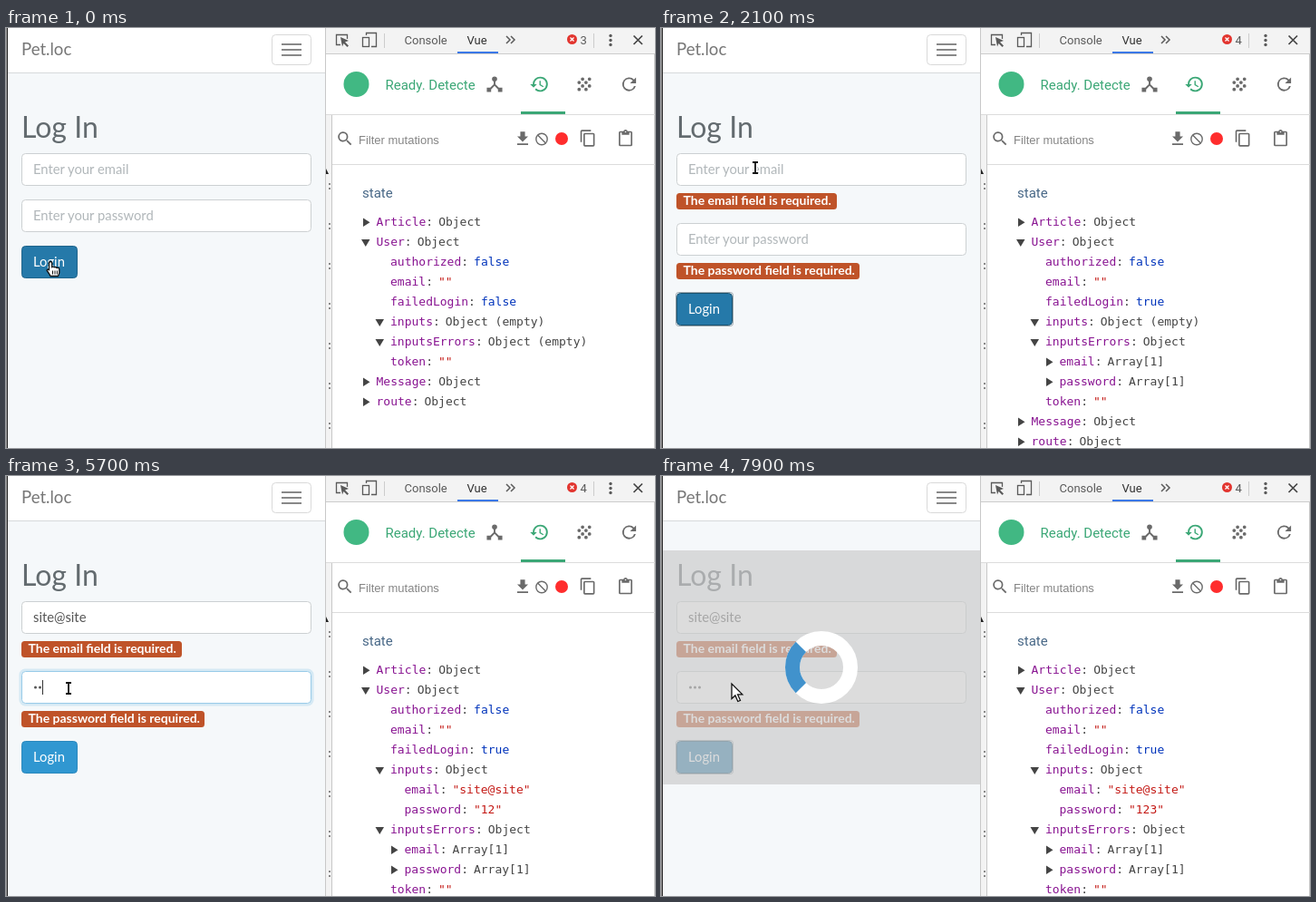
Recreate the animation shown at these times as an HTML page. Size 716x463 px, loop 8000 ms.

```html
<!DOCTYPE html>
<html lang="en">
<head>
<meta charset="utf-8">
<title>Log In</title>
<style>
  html, body { margin: 0; width: 100%; height: 100%; overflow: hidden; background: #fff; }
  svg { display: block; }
  .page { font-family: Lato, "Open Sans", sans-serif; font-size: 14.8px; fill: #636b6f; }
  .tools { font-family: Roboto, sans-serif; font-size: 13px; fill: #5a5a5a; }
  .tree { font-family: "DejaVu Sans Mono", monospace; font-size: 13px; fill: #444; }
  .hint { fill: #b1b7ba; }
  .typed { fill: #555; }
  .badge { fill: #fff; font-weight: 700; font-size: 14px; }
  .key { fill: #881391; }
  .str { fill: #c41a16; }
  .lit { fill: #0033bb; }
</style>
</head>
<body>
<svg width="716" height="463" viewBox="0 0 716 463">
  <rect width="353" height="463" fill="#f5f8fa"/>
  <rect width="353" height="49" fill="#fff"/>
  <rect y="49" width="353" height="1" fill="#d6d9db"/>
  <g class="page">
    <text x="17" y="29.5" font-size="18.6" fill="#777">Pet.loc</text>
    <rect x="293.5" y="7.5" width="43" height="33" rx="4" fill="#fff" stroke="#d9d9d9"/>
    <path d="M304 18h22M304 24h22M304 30h22" stroke="#888" stroke-width="2"/>
    <text x="17" y="121" font-size="32">Log In</text>
  </g>
  <g id="form" class="page"></g>
  <rect width="1" height="463" fill="#999"/>
  <rect x="1" width="1" height="463" fill="#222"/>

  <rect x="352" width="364" height="463" fill="#fff"/>
  <rect x="353" width="363" height="28" fill="#f3f3f3"/>
  <rect x="353" y="28" width="363" height="1" fill="#ccc"/>
  <rect x="353" y="96" width="7" height="367" fill="#f3f3f3"/>
  <path d="M352.5 0V463M359.5 96V463M715.5 29V463" stroke="#c8c8c8"/>
  <path d="M353 95.5H716M360 150.5H716" stroke="#dcdcdc"/>
  <path d="M353 155v6h3z" fill="#222"/>
  <g id="marks" fill="#888"></g>

  <g class="tools">
    <g fill="none" stroke="#5a5a5a" stroke-width="1.3">
      <path d="M376.5 12V7.5H364.500V18.500H369"/>
      <path d="M397.500 8V5.500H408.500V20.500H403"/>
      <rect x="393.500" y="10.500" width="7" height="10"/>
    </g>
    <path d="M369 10l9 4-4 1.500 4 4-1.500 1.500-4-4-1.500 3.500z"/>
    <path d="M417.500 6V22M648.500 6V22" stroke="#ccc"/>
    <text x="439.500" y="18">Console</text>
    <text x="508.500" y="18" fill="#333">Vue</text>
    <rect x="498" y="26" width="45" height="2" fill="#3b78e7"/>
    <path d="M552 9l4 4-4 4M557 9l4 4-4 4" fill="none" stroke="#5a5a5a" stroke-width="1.500"/>
    <circle cx="624.500" cy="12.500" r="5.500" fill="#e2352f"/>
    <path d="M622.500 10.500l4 4m0-4l-4 4" stroke="#fff" stroke-width="1.300"/>
    <text id="count" x="633.500" y="18"></text>
    <circle cx="667" cy="8.500" r="1.700"/><circle cx="667" cy="13.500" r="1.700"/><circle cx="667" cy="18.500" r="1.700"/>
    <path d="M692.500 8.500l9.500 9.500m0-9.500l-9.500 9.500" stroke="#444" stroke-width="1.700"/>

    <circle cx="386.500" cy="62" r="14" fill="#41b883"/>
    <text x="418.500" y="68" font-size="15" fill="#3ba776">Ready. Detecte</text>
    <rect x="568" y="92" width="49" height="3" fill="#3ba776"/>
    <g id="icons" fill="#6a6a6a"></g>
    <text x="389" y="128" fill="#858585" font-family="Liberation Sans, Arial, sans-serif">Filter mutations</text>
    <g fill="none" stroke="#6a6a6a" stroke-width="1.400"><circle cx="591" cy="122.500" r="6.200"/><path d="M586.600 118.100l8.800 8.800"/></g>
    <circle cx="613" cy="122" r="7" fill="#ff2d2d"/>
    <text x="393" y="187" font-size="15" fill="#486887">state</text>
  </g>
  <g id="tree" class="tree"></g>
  <g id="cursor"></g>
</svg>
<script>
const $ = id => document.getElementById(id);
const LOOP = 8000, STEP = 100;
const EMAIL = 'site@site', PASS = '123';
const emailKeys = [2400, 2500, 2600, 3400, 3800, 4100, 4200, 4400, 4500];
const passKeys = [5600, 5700, 5800];
const FAIL = 1500;
const loaders = [
  { from: 700, to: FAIL, spin: 683, y: 85, h: 200 },
  { from: 6400, to: LOOP, spin: 6400, y: 82, h: 258 }
];
const focusAt = [[0, ''], [700, 'login'], [2300, 'email'], [5500, 'pass'], [6300, 'login']];
// time, x, y
const path = [
  [0, 49, 257], [1700, 49, 257], [2000, 104, 154], [4700, 104, 154], [5200, 69, 234],
  [5800, 69, 234], [6100, 55, 297], [6700, 55, 297], [7100, 75, 240], [7300, 78, 229]
];

// Material-style icons: centre x, centre y, scale, path
const icons = [
  [539, 62, .95, 'M17 16l-4-4V8.820C14.160 8.400 15 7.300 15 6a3 3 0 0 0-6 0c0 1.300.840 2.400 2 2.820V12l-4 4H3v5h5v-3.050l4-4.200 4 4.200V21h5v-5z'],
  [588.5, 62, .93, 'M13 3a9 9 0 0 0-9 9H1l3.890 3.890.070.140L9 12H6a7 7 0 1 1 2.060 4.940l-1.420 1.420A9 9 0 1 0 13 3zm-1 5v5l4.280 2.540.720-1.210-3.500-2.080V8z', '#3ba776'],
  [638, 62, .95, [[10, 14], [6, 10], [6, 18], [18, 6], [14, 18], [18, 14], [14, 10], [10, 6]]
    .map(([x, y]) => `M${x - 2} ${y}a2 2 0 1 0 4 0a2 2 0 1 0-4 0z`).join('')],
  [687.5, 62, .95, 'M17.650 6.350A8 8 0 1 0 19.730 14h-2.080A6 6 0 1 1 12 6c1.660 0 3.140.690 4.220 1.780L13 11h7V4z'],
  [374, 122, .86, 'M15.500 14h-.790l-.280-.270A6.500 6.500 0 1 0 13.730 14.430l.270.280v.790l5 4.990L20.490 19zm-6 0a4.500 4.500 0 1 1 0-9a4.500 4.500 0 0 1 0 9z'],
  [570, 122, .86, 'M19 9h-4V3H9v6H5l7 7zM5 18v2h14v-2z'],
  [642, 121.5, .83, 'M16 1H4a2 2 0 0 0-2 2v14h2V3h12zm3 4H8a2 2 0 0 0-2 2v14a2 2 0 0 0 2 2h11a2 2 0 0 0 2-2V7a2 2 0 0 0-2-2zm0 16H8V7h11z'],
  [683.5, 122, .83, 'M19 2h-4.180a3 3 0 0 0-5.640 0H5a2 2 0 0 0-2 2v16a2 2 0 0 0 2 2h14a2 2 0 0 0 2-2V4a2 2 0 0 0-2-2zm-7 0a1 1 0 1 1 0 2a1 1 0 0 1 0-2zm7 18H5V4h2v3h10V4h2z']
];
$('icons').innerHTML = icons.map(([x, y, s, d, c]) =>
  `<path transform="translate(${x} ${y}) scale(${s}) translate(-12 -12)" fill-rule="evenodd" d="${d}"${c ? ` fill="${c}"` : ''}/>`).join('');
$('marks').innerHTML = Array.from({ length: 7 }, (_, i) =>
  `<path d="M356 ${171 + i * 44}h2v2h-2zm0 5h2v2h-2z"/>`).join('');

const pens = {
  arrow: '<path d="M0 0V16.500l3.900-3.600 2.900 6.600 2.700-1.200-2.900-6.400h5.200z" fill="#fff" stroke="#111" stroke-width="1.300"/>',
  hand: '<path d="M-1.500 1.500q1.700-2 3.200 0v5q1.500-1 2.700.3q1.500-.8 2.600.6q2.500-.6 2.800 1.500v4q-.5 1.600-1.300 3.600H0q-1-2.500-3.800-6q-.3-2 2.300-.8z" fill="#fff" stroke="#111" stroke-width="1.300"/><path d="M2.500 10.500v4m2.500-4v4m2.400-4v4" stroke="#111"/>',
  beam: '<g fill="none"><path d="M-3 -6H3M0 -6V6M-3 6H3" stroke="#fff" stroke-width="4"/><path d="M-3 -6H3M0 -6V6M-3 6H3" stroke="#111" stroke-width="1.800"/></g>'
};

const ruler = document.createElement('canvas').getContext('2d');
function widthOf(s) {
  ruler.font = '14.8px Lato, "Open Sans", sans-serif';
  return ruler.measureText(s).width;
}
const typedCount = (keys, t) => keys.filter(k => k <= t).length;

function pointer(t) {
  let i = 0;
  while (i < path.length - 1 && path[i + 1][0] <= t) i++;
  const a = path[i], b = path[i + 1] || a;
  const k = b === a ? 0 : (t - a[0]) / (b[0] - a[0]);
  return [a[1] + (b[1] - a[1]) * k, a[2] + (b[2] - a[2]) * k];
}

function field(y, focused, content) {
  const glow = focused
    ? `<rect x="16" y="${y - 1}" width="322" height="38" rx="5" fill="none" stroke="#98cbe8" stroke-opacity=".35" stroke-width="3"/>` : '';
  return glow + `<rect x="17.500" y="${y + .5}" width="319" height="35" rx="4" fill="#fff" stroke="${focused ? '#98cbe8' : '#ccd0d2'}"/>` + content;
}
const label = (y, w, s) =>
  `<rect x="17" y="${y}" width="${w}" height="18" rx="3.500" fill="#bf5329"/><text class="badge" x="24.500" y="${y + 13}">${s}</text>`;

function caret(x, y, t, since) {
  return (t - since) % 1100 < 550 ? `<rect x="${Math.round(x)}" y="${y}" width="1" height="16" fill="#333"/>` : '';
}

function drawForm(s, t) {
  const { email, dots, focus, failed, loader, passY, loginY, hover } = s;
  const last = (keys, start) => Math.max(start, ...keys.filter(k => k <= t));
  const hint = (y, text) => `<text class="hint" x="30" y="${y}">${text}</text>`;

  let mail = email ? `<text class="typed" x="30" y="161">${email}</text>` : hint(161, 'Enter your email');
  if (focus === 'email') mail += caret(30 + widthOf(email), 148, t, last(emailKeys, 2300));

  let pass = hint(passY + 23, 'Enter your password');
  if (dots) pass = Array.from({ length: dots }, (_, i) =>
    `<circle class="typed" cx="${32.5 + i * 5}" cy="${passY + 18}" r="1.500"/>`).join('');
  if (focus === 'pass') pass += caret(30 + dots * 5, passY + 10, t, last(passKeys, 5500));

  const held = focus === 'login', dark = held || hover;
  let out = field(138, focus === 'email', mail) + field(passY, focus === 'pass', pass);
  if (failed) out += label(182, 177, 'The email field is required.') + label(259, 202, 'The password field is required.');
  if (held) out += `<rect x="16.500" y="${loginY - .5}" width="63" height="37" rx="3" fill="none" stroke="#9aa6ad"/>`;
  out += `<rect x="17.500" y="${loginY + .5}" width="61" height="35" rx="4" fill="${dark ? '#2579a9' : '#3097d1'}" stroke="${held ? '#1a526f' : dark ? '#1f648b' : '#2a88bd'}"/>` +
    `<text x="30" y="${loginY + 23}" fill="#fff">Login</text>`;

  if (loader) {
    const cy = loader.y + loader.h / 2, turn = (t - loader.spin) * .18 - 135;
    out += `<rect x="2" y="${loader.y}" width="350" height="${loader.h}" fill="#ccc" fill-opacity=".68"/>` +
      `<g fill="none" stroke-width="16" transform="translate(177 ${cy}) rotate(${turn})"><circle r="32" stroke="#fff"/>` +
      '<path d="M32 0A32 32 0 0 1 0 32" stroke="#4192cc"/></g>';
  }
  $('form').innerHTML = out;
}

// level, arrow (1 open, 0 closed, none), key, value, class
function treeRows({ email, dots, failed }) {
  const rows = [
    [0, 0, 'Article', 'Object'], [0, 1, 'User', 'Object'],
    [1, null, 'authorized', 'false', 'lit'], [1, null, 'email', '""', 'str'],
    [1, null, 'failedLogin', String(failed), 'lit'],
    [1, 1, 'inputs', email ? 'Object' : 'Object (empty)']
  ];
  if (email) rows.push([2, null, 'email', `"${email}"`, 'str']);
  if (dots) rows.push([2, null, 'password', `"${PASS.slice(0, dots)}"`, 'str']);
  rows.push([1, 1, 'inputsErrors', failed ? 'Object' : 'Object (empty)']);
  if (failed) rows.push([2, 0, 'email', 'Array[1]'], [2, 0, 'password', 'Array[1]']);
  rows.push([1, null, 'token', '""', 'str'], [0, 0, 'Message', 'Object'], [0, 0, 'route', 'Object']);
  return rows;
}

function drawTree(s) {
  $('tree').innerHTML = treeRows(s).map(([level, open, key, val, cls], i) => {
    const x = 408.5 + level * 15.5, y = 214 + i * 22;
    const arrow = open === null ? '' : open
      ? `<path d="M${x - 16.5} ${y - 3}h9.500l-4.750 8z"/>`
      : `<path d="M${x - 14.5} ${y - 4.5}v9.500l7.500-4.750z"/>`;
    return arrow + `<text x="${x}" y="${y + 4}"><tspan class="key">${key}</tspan>:` +
      `<tspan dx="6" class="${cls || ''}">${val}</tspan></text>`;
  }).join('');
}

function draw(t) {
  const [x, y] = pointer(t);
  const failed = t >= FAIL;
  const passY = failed ? 215 : 189, loginY = failed ? 292 : 240;
  const loader = loaders.find(l => t >= l.from && t < l.to);
  const within = (top, right) => !loader && x >= 17 && x <= right && y >= top && y <= top + 36;
  const hover = within(loginY, 79);
  const s = {
    failed, passY, loginY, loader, hover,
    email: EMAIL.slice(0, typedCount(emailKeys, t)),
    dots: typedCount(passKeys, t),
    focus: focusAt.filter(f => f[0] <= t).pop()[1]
  };
  drawForm(s, t);
  drawTree(s);
  $('count').textContent = failed ? 4 : 3;
  const pen = hover ? 'hand' : within(138, 337) || within(passY, 337) ? 'beam' : 'arrow';
  $('cursor').innerHTML = `<g transform="translate(${x} ${y})">${pens[pen]}</g>`;
}

let shown = -1;
const start = performance.now();
function tick() {
  const t = Math.floor(((performance.now() - start) % LOOP) / STEP) * STEP;
  if (t !== shown) draw(shown = t);
  requestAnimationFrame(tick);
}
tick();
</script>
</body>
</html>
```
